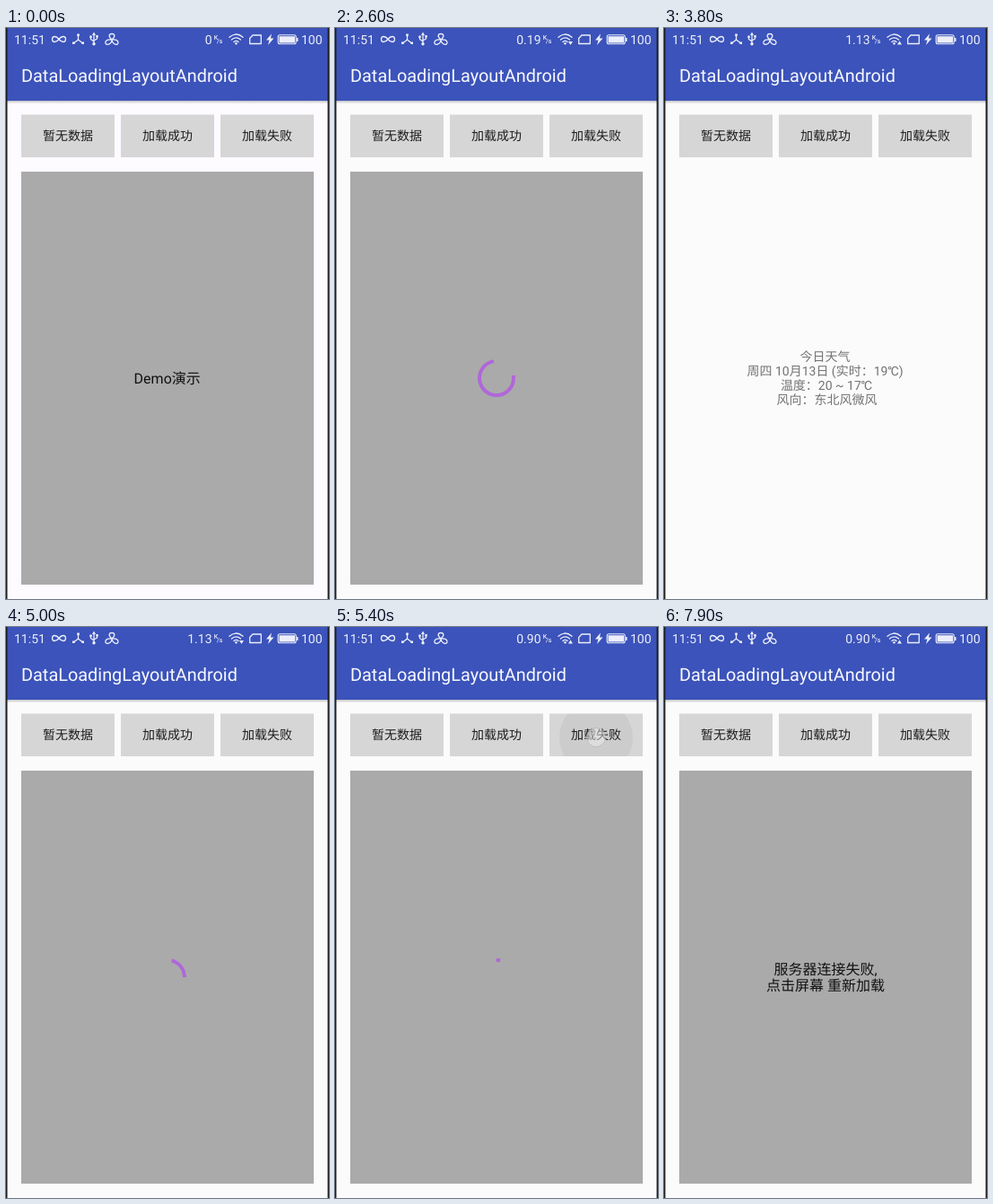
Write an HTML page that moves like this. It is 360 px wide and 636 px high and loops after 8000 ms.

```html
<!DOCTYPE html>
<html lang="zh-CN">
<head>
<meta charset="utf-8">
<title>Loading layout demo</title>
<style>
  html, body { margin: 0; width: 100%; height: 100%; overflow: hidden; }
  svg { display: block; width: 360px; height: 636px; }
  text { font-family: Roboto, "Noto Sans CJK SC", "Noto Sans CJK", sans-serif; text-rendering: geometricPrecision; }
  .bar text { fill: #eceefa; font-size: 14px; }
  .bar .unit { font-size: 7px; font-weight: 500; }
  .bar .title { font-size: 19.9px; fill: #f8f8fd; }
  .line { fill: none; stroke: #eceefa; stroke-width: 1.3; stroke-linecap: round; stroke-linejoin: round; }
  .solid { fill: #eceefa; }
  .label { font-size: 14px; fill: #1c1c1c; text-anchor: middle; }
  .message { font-size: 16px; fill: #111; text-anchor: middle; }
  .weather { font-size: 14px; fill: #737373; text-anchor: middle; }
  #arc { fill: none; stroke: #b067d9; stroke-width: 4; stroke-linecap: square; }
</style>
</head>
<body>
<svg viewBox="0 0 360 636">
  <defs>
    <linearGradient id="shade" x2="0" y2="1">
      <stop offset="0" stop-color="#000" stop-opacity=".22"/>
      <stop offset="1" stop-color="#000" stop-opacity="0"/>
    </linearGradient>
    <clipPath id="buttons">
      <path d="M17 96.500h104v47.500H17zM128 96.500h104v47.500H128zM239 96.500h104v47.500H239z"/>
    </clipPath>
  </defs>

  <rect id="page" width="360" height="636" fill="#fbfbfb"/>
  <rect y="81" width="360" height="3.500" fill="url(#shade)"/>

  <g class="bar">
    <rect width="360" height="81" fill="#3b53ba"/>
    <text x="9" y="17.700">11:51</text>
    <path class="line" d="M59 12.500C56 8.500 51.500 8.500 51.500 12.500S56 16.500 59 12.500S66.500 8.500 66.500 12.500S62 16.500 59 12.500"/>
    <path class="line" d="M80.500 8V13L75.500 17M80.500 13L85.500 17"/>
    <path class="solid" d="M79.200 6.500h2.600v2.500h-2.600zM74 15.500h2.600v2.500H74zM84.400 15.500H87v2.500h-2.600z"/>
    <path class="line" d="M98 7V17M94.500 10v2.500L98 15M101.500 9.500v2.500L98 14"/>
    <path class="solid" d="M98 4.500l2 3.500h-4zM93.300 8.500h2.400v2.500h-2.400zM100.300 8h2.400v2.500h-2.400z"/>
    <circle class="solid" cx="98" cy="17.700" r="1.700"/>
    <path class="line" d="M118 13C113.500 9.500 115 6.500 118 6.500S122.500 9.500 118 13C117.500 19 111 19.500 110.800 16.500S114.500 12.500 118 13C121.500 12.500 125.200 13.500 125 16.500S119 19 118 13"/>
    <text id="speed" x="229.500" y="17.700" text-anchor="end"></text>
    <text class="unit" x="231.700" y="12.500">K</text>
    <text class="unit" x="235" y="17">/s</text>
    <path class="line" d="M249 10.300q7.500 -6.500 15 0M251.500 13q5 -4.300 10 0M254 15.500q2.500 -2.200 5 0"/>
    <circle class="solid" cx="256.500" cy="17.300" r="1.200"/>
    <path id="traffic" class="solid"/>
    <path class="line" d="M275 8H284.300V17.500H271.700V11.500Z"/>
    <path class="solid" d="M296 6.500L290 13.500H293.500L292 19L298.500 11.500H295Z"/>
    <rect class="line" x="303.200" y="7.800" width="20" height="10" rx="2" style="stroke-width:1.100"/>
    <path class="solid" d="M304.500 9.200h17.500v7.200h-17.500zM324 11h1.500v4H324z"/>
    <text x="329" y="17.700">100</text>
    <text class="title" x="17" y="60.300">DataLoadingLayoutAndroid</text>
  </g>

  <path d="M17 96.500h104v47.500H17zM128 96.500h104v47.500H128zM239 96.500h104v47.500H239z" fill="#d6d6d6"/>
  <circle id="ripple" clip-path="url(#buttons)"/>
  <text class="label" x="69" y="125.400">暂无数据</text>
  <text class="label" x="180" y="125.400">加载成功</text>
  <text class="label" x="291" y="125.400">加载失败</text>
  <circle id="touch" r="10.500" fill="#eee" fill-opacity=".5" stroke="#aaa" stroke-opacity=".5"/>

  <rect id="panel" x="17" y="160" width="326" height="460" fill="#aaa"/>
  <g id="demo" class="message"><text x="179.700" y="396">Demo演示</text></g>
  <g id="empty" class="message">
    <text x="180" y="386.500">暂无数据,</text>
    <text x="180" y="405.300">点击屏幕 重新加载</text>
  </g>
  <g id="fail" class="message">
    <text x="180" y="386.500">服务器连接失败,</text>
    <text x="180" y="405.300">点击屏幕 重新加载</text>
  </g>
  <g id="weather" class="weather">
    <text x="179.500" y="370.600">今日天气</text>
    <text x="179.500" y="387">周四 10月13日 (实时：19℃)</text>
    <text x="181" y="403.200">温度：20 ~ 17℃</text>
    <text x="181.500" y="419.300">风向：东北风微风</text>
  </g>
  <g id="load"><circle id="arc" cx="180" cy="390" r="19" pathLength="360"/></g>

  <path d="M0 0h1.500v636H0zM358.500 0h1.500v636h-1.500z" fill="#1c1c1c"/>
</svg>
<script>
  const LOOP = 8000, STEP = 100, CYCLE = 1333;
  const $ = id => document.getElementById(id);

  // Timelines: [start in ms, value]
  const scenes = [[0, 'demo'], [567, 'load'], [1900, 'empty'], [2107, 'load'], [3200, 'weather'],
    [4007, 'load'], [5100, 'weather'], [5370, 'load'], [7400, 'fail']];
  const speeds = [[0, '0'], [1800, '0.19'], [3100, '1.13'], [5200, '0.90']];
  const traffic = [[0, ''], [900, 'down'], [3000, 'up'], [4300, 'down'], [5200, 'up'], [6700, 'down'], [7500, 'up']];
  const presses = [[400, 69], [1940, 180], [3840, 180], [5200, 291]];
  const arrows = { '': '', down: 'M260 15h5l-2.500 4z', up: 'M260 18.500h5l-2.500 -4z' };
  const layers = ['demo', 'empty', 'fail', 'weather', 'load'];

  const current = (list, t) => list.filter(item => item[0] <= t).pop();
  const clamp = x => Math.min(1, Math.max(0, x));
  const show = (id, on) => { $(id).style.display = on ? '' : 'none'; };

  // cubic-bezier(.4, 0, .2, 1)
  function ease(x) {
    let lo = 0, hi = 1, u = x;
    for (let i = 0; i < 20; i++) {
      u = (lo + hi) / 2;
      const v = 1 - u;
      if (1.2 * v * v * u + 0.6 * v * u * u + u * u * u < x) lo = u; else hi = u;
    }
    return u * u * (3 - 2 * u);
  }

  // Head sweeps in the first half of a cycle, tail catches up in the second.
  function spin(age) {
    const p = age / CYCLE % 1;
    const tail = 270 * ease(clamp(2 * p - 1));
    const head = 270 * ease(clamp(2 * p));
    const turn = 90 * p + 144 * age / CYCLE - 90;
    $('arc').setAttribute('transform', `rotate(${turn + tail} 180 390)`);
    $('arc').setAttribute('stroke-dasharray', `${Math.max(0.1, head - tail)} 720`);
  }

  function press(t) {
    const hit = current(presses, t);
    const age = hit ? t - hit[0] : LOOP;
    show('ripple', age < 600);
    show('touch', age <= 200);
    if (age >= 600) return;
    for (const id of ['ripple', 'touch']) {
      $(id).setAttribute('cx', hit[1]);
      $(id).setAttribute('cy', 123);
    }
    $('ripple').setAttribute('r', 10 + 31 * age / 200);
    $('ripple').setAttribute('fill-opacity', 0.048 * clamp((600 - age) / 400));
  }

  function draw(t) {
    const [start, scene] = current(scenes, t);
    layers.forEach(id => show(id, id === scene));
    show('panel', scene !== 'weather');
    if (scene === 'load') spin(t - start);
    press(t);
    $('page').setAttribute('fill', t < 100 ? '#fdfbff' : '#fbfbfb');
    $('speed').textContent = current(speeds, t)[1];
    $('traffic').setAttribute('d', arrows[current(traffic, t)[1]]);
  }

  const begin = performance.now();
  function tick() {
    const t = (performance.now() - begin) % LOOP;
    draw(Math.floor(t / STEP) * STEP);
    requestAnimationFrame(tick);
  }
  tick();
</script>
</body>
</html>
```
